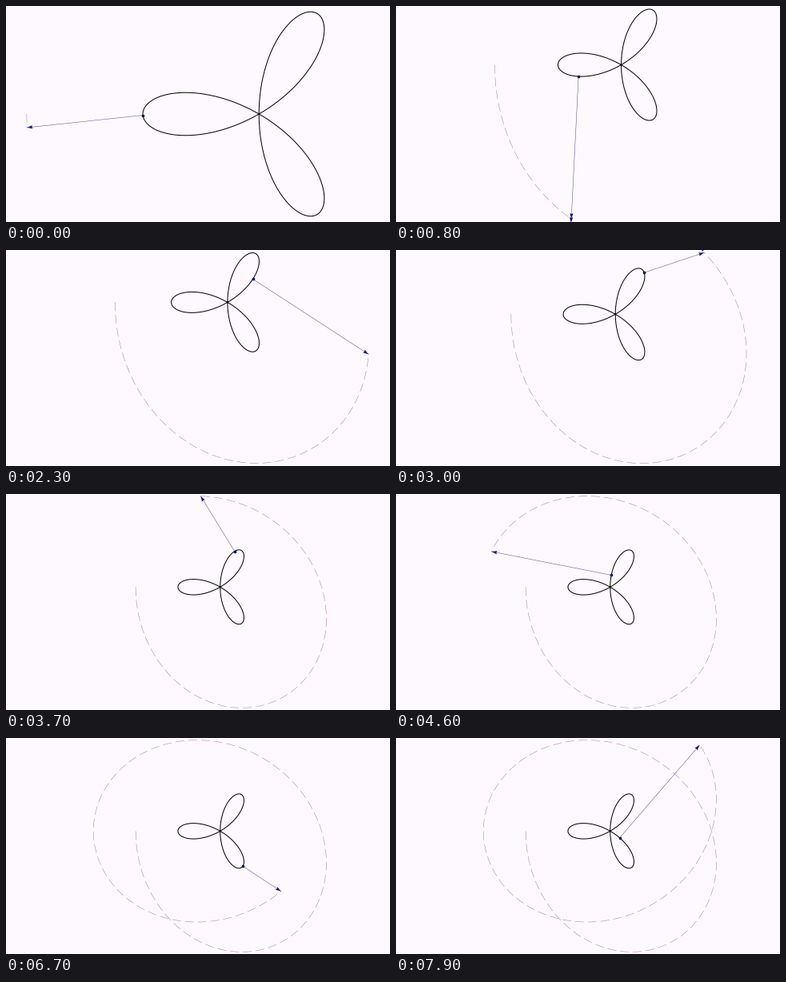
Recreate the animation shown at these times as a matplotlib script. Size 480 by 270 pixels, loop 8 s.

```python
import numpy as np
import matplotlib.pyplot as plt
from matplotlib.animation import FuncAnimation

W, H, DPI = 480, 270, 72      # at 72 dpi one point is one pixel
FRAMES, INTERVAL = 80, 100
STEP = 0.01061                # parameter advance of one sub-step
X_MID, PAD = -0.525, 0.05
NAVY = "#000080"


def trifolium(t):
    return -np.cos(3 * t) * np.array([np.cos(t), np.sin(t)])


def tip(t):
    """Point on the curve plus its velocity turned a quarter clockwise."""
    c, s = np.cos(t), np.sin(t)
    return -2 * np.cos(3 * t) * np.array([c, s]) + 3 * np.sin(3 * t) * np.array([s, -c])


PETALS = trifolium(np.linspace(0, np.pi, 601))


def make_view(t):
    """Map to pixels so that everything drawn up to t fits vertically."""
    ys = np.concatenate([PETALS[1], tip(np.linspace(0, t, 500))[1]])
    top = ys.max() + PAD
    scale = H / (top - ys.min() + PAD)

    def to_px(p):
        return np.array([W / 2 + (p[0] - X_MID) * scale, (top - p[1]) * scale])

    return to_px


def head_shape(start, end, length=7, half=2.1, notch=6):
    d = (end - start) / np.hypot(*(end - start))
    n = np.array([-d[1], d[0]])
    back = end - length * d
    return np.array([end, back + half * n, end - notch * d, back - half * n])


fig = plt.figure(figsize=(W / DPI, H / DPI), dpi=DPI, facecolor="#fef9ff")
ax = fig.add_axes([0, 0, 1, 1])
ax.set(xlim=(0, W), ylim=(H, 0))
ax.axis("off")

curve, = ax.plot([], [], color="black", lw=1, solid_capstyle="butt")
trail, = ax.plot([], [], color="#a87c94", lw=0.5, dashes=(22, 10),
                 dash_capstyle="butt")
shaft, = ax.plot([], [], color="#50489c", lw=0.5)
dot, = ax.plot([], [], "o", color=NAVY, ms=3.6, mew=0, snap=False)
head, echo = (ax.fill([0, 0, 0], [0, 0, 0], color=NAVY, lw=0)[0] for _ in range(2))


def update(i):
    t = STEP * (3 * i + 1)
    view, before = make_view(t), make_view(t - STEP)
    start, end = view(trifolium(t)), view(tip(t))
    curve.set_data(*view(PETALS))
    trail.set_data(*view(tip(np.linspace(0, t, 400))))
    shaft.set_data(*np.transpose([start, end]))
    dot.set_data([start[0]], [start[1]])
    head.set_xy(head_shape(start, end))
    # a growing view leaves a second head at the edge
    late = before(tip(t))
    echo.set_xy(head_shape(before(trifolium(t)), late))
    echo.set_visible(np.hypot(*(late - end)) > 0.5 and not 0 < late[1] < H)
    return curve, trail, shaft, dot, head, echo


anim = FuncAnimation(fig, update, frames=FRAMES, interval=INTERVAL,
                     repeat=True, repeat_delay=0)
plt.show()
```
